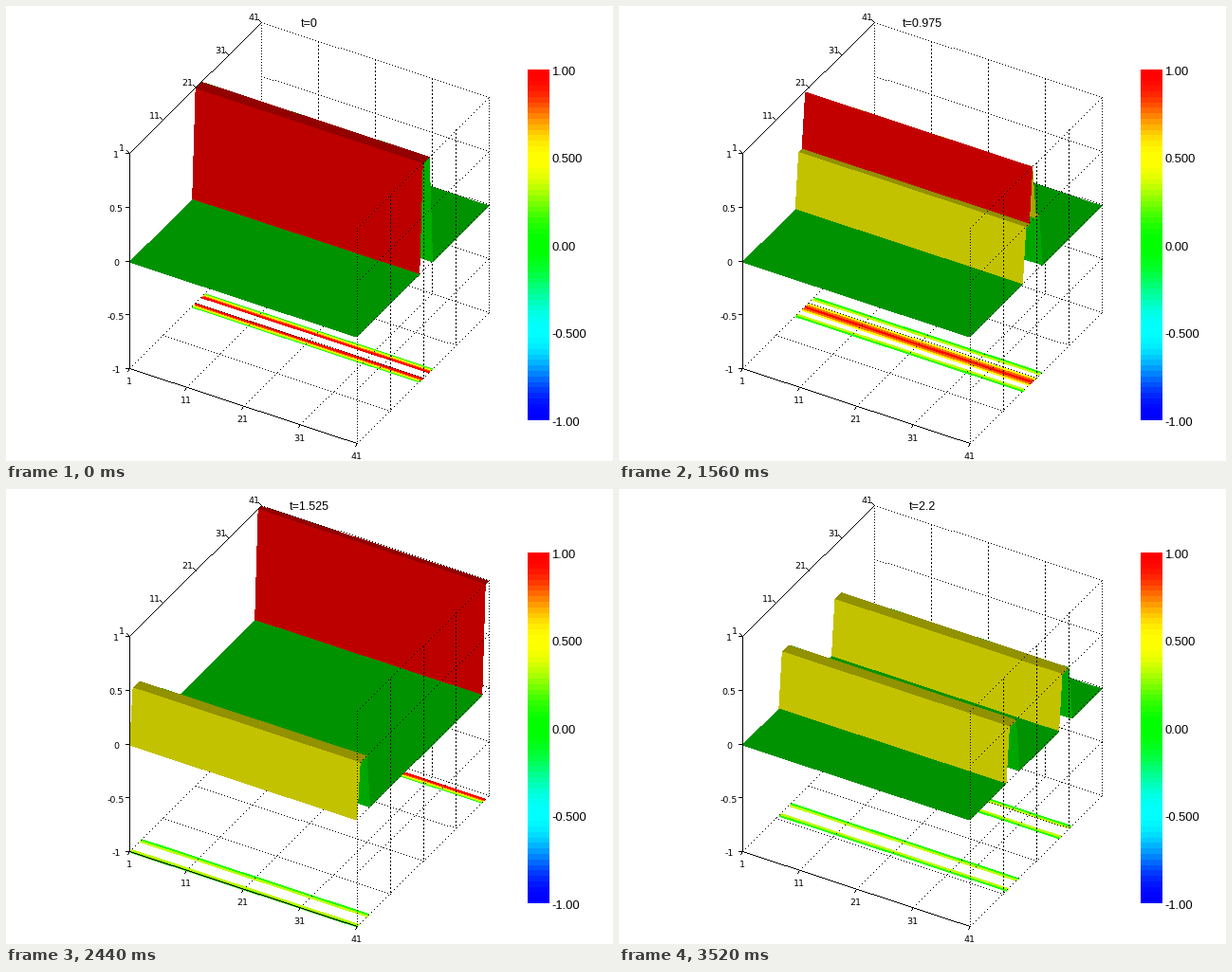
These frames come from a looping animation (640 by 480 pixels, 3.56 s). A matplotlib script:

```python
import colorsys

import numpy as np
import matplotlib.pyplot as plt
from matplotlib.animation import FuncAnimation
from matplotlib.collections import LineCollection, PolyCollection
from matplotlib.patches import Rectangle

W, H, DPI = 640, 480, 100
PX = 72 / DPI                      # points per pixel
FRAMES, INTERVAL, DT = 89, 40, 0.025
N = 40                             # cells along each side
EDGE = N - 0.15                    # surface stops just inside the box
CENTER = 21                        # middle of the starting pulse
LEVELS = np.linspace(-1, 1, 10)
CELL = 2 / N                       # cell size in a cube of side 2

ELEV, TURN = np.radians(34.9), np.radians(29.9)
VIEW_Y, VIEW_Z = -np.cos(ELEV) * np.cos(TURN), np.sin(ELEV)


def project(x, y, z):
    """Grid position (0..40, 0..40, -1..1) to stage pixels."""
    return (130.5 + 6 * x + 3.475 * y,
            270 + 1.978 * x - 3.455 * y - 113.5 * z)


def rainbow(value):
    """Blue to red in 64 steps, each channel eased by an S-curve."""
    i = min(63, int((value + 1) / 2 * 64))
    rgb = np.array(colorsys.hsv_to_rgb(2 / 3 * (1 - i / 63), 1, 1))
    return (1 + np.cos((1 - rgb) * np.pi)) / 2


def pulse(k):
    """Starting shape, mirrored at both walls."""
    folded = np.abs((k + N) % (2 * N) - N)
    return (np.abs(folded - CENTER) <= 1).astype(float)


def wave(n):
    j = np.arange(N + 1)
    return (pulse(j - n) + pulse(j + n)) / 2


def shade(rise):
    """Headlight brightness of a strip that climbs by rise over one cell."""
    return abs(VIEW_Z * CELL - VIEW_Y * rise) / np.hypot(CELL, rise)


fig = plt.figure(figsize=(W / DPI, H / DPI), dpi=DPI, facecolor="white")
ax = fig.add_axes([0, 0, 1, 1])
ax.set_xlim(0, W)
ax.set_ylim(H, 0)
ax.axis("off")


def pixel_line(p, q, zorder, period=1, on=1):
    """Crisp one-pixel line; shows `on` of every `period` pixels."""
    (x0, y0), (x1, y1) = p, q
    steps = int(round(max(abs(x1 - x0), abs(y1 - y0))))
    k = np.arange(steps + 1)
    k = k[k % period < on]
    # Pixel markers fill the pixel whose whole-number corner they are given.
    xs = np.floor(x0 + (x1 - x0) * k / steps)
    ys = np.floor(y0 + (y1 - y0) * k / steps)
    ax.plot(xs, ys, ",", color="black", zorder=zorder, antialiased=False)


def dots(a, b, zorder):
    pixel_line(project(*a), project(*b), zorder, 3, 1)


def dashes(a, b, zorder):
    pixel_line(project(*a), project(*b), zorder, 4, 2)


def label(x, y, text, size, font="DejaVu Sans", ha="center"):
    return ax.text(x, y + 0.36 * size, text, fontsize=size * PX, family=font,
                   ha=ha, va="baseline", color="black", zorder=8)


def tick(x, y, dx, dy):
    pixel_line((x, y), (x + dx, y + dy), 7)


def draw_grid():
    back, front = 2, 6
    for g in (0, 10, 20, 30, 40):
        inner = dashes if 0 < g < N else dots
        inner((g, N, 1), (g, N, -1), back)
        inner((N, g, 1), (N, g, -1), front)
        dots((g, 0, -1), (g, N, -1), back)
        if g:
            dots((0, g, -1), (N, g, -1), back)
    for z in (-1, -0.5, 0, 0.5, 1):
        dots((0, N, z), (N, N, z), back)
        dots((N, 0, z), (N, N, z), front)


def draw_axes():
    corner = project(0, 0, 1)
    pixel_line(project(0, 0, -1), project(N, 0, -1), 7)
    pixel_line(corner, project(0, 0, -1), 7)
    pixel_line(corner, project(0, N, 1), 7)
    for g in (0, 10, 20, 30, 40):
        x, y = project(g, 0, -1)
        tick(x, y, -2, 3)
        label(x - 1, y + 12.3, str(g + 1), 9.5)
        x, y = project(0, g, 1)
        tick(x, y, -3, -3)
        label(x - 8.5, y - 6.5, str(g + 1), 9.5)
    for z in (-1, -0.5, 0, 0.5, 1):
        x, y = project(0, 0, z)
        tick(x, y, -4, 0)
        label(x - 14.5, y + 0.5, f"{z:g}", 9.5)


def draw_colorbar():
    left, top, width, height = 550, 67, 23, 370
    step = height / 64
    for i in range(64):
        color = rainbow((i + 0.5) / 32 - 1)
        y = top + height - (i + 1) * step
        ax.add_patch(Rectangle((left, y), width, step, facecolor=color,
                               edgecolor="none", antialiased=False))
    for i, text in enumerate(("1.00", "0.500", "0.00", "-0.500", "-1.00")):
        label(575.5, top + 1.3 + i * height / 4, text, 13,
              "Liberation Sans", "left")


draw_grid()
draw_axes()
draw_colorbar()
title = label(320, 17.8, "", 12.5, "Liberation Sans")
contours = LineCollection([], linewidths=PX, antialiaseds=False, zorder=1)
surface = PolyCollection([], edgecolors="none", antialiaseds=False, zorder=4)
ax.add_collection(contours, autolim=False)
ax.add_collection(surface, autolim=False)


def surface_strips(u):
    """Strips from the back to the front, coloured by their far edge."""
    quads, colors = [], []
    for j in reversed(range(N)):
        a, b = u[j], u[j + 1]
        corners = ((0, j, a), (EDGE, j, a), (EDGE, j + 1, b), (0, j + 1, b))
        quads.append([project(*c) for c in corners])
        colors.append(rainbow(b) * shade(b - a))
    return np.array(quads) + (0.1, 0.2), colors


def contour_lines(u):
    lines, colors = [], []
    for j in range(N):
        a, b = u[j], u[j + 1]
        if a == b:
            continue
        for level in LEVELS:
            if min(a, b) < level <= max(a, b):
                y = j + (level - a) / (b - a)
                lines.append([project(0, y, -1), project(EDGE, y, -1)])
                colors.append(rainbow(level))
    return lines, colors


def update(n):
    u = wave(n)
    quads, colors = surface_strips(u)
    surface.set_verts(quads)
    surface.set_facecolor(colors)
    lines, colors = contour_lines(u)
    contours.set_segments(lines)
    contours.set_color(colors)
    title.set_text(f"t={n * DT:g}")
    return surface, contours, title


anim = FuncAnimation(fig, update, frames=FRAMES, interval=INTERVAL,
                     init_func=lambda: update(0), repeat=True, blit=False)
plt.show()
```
